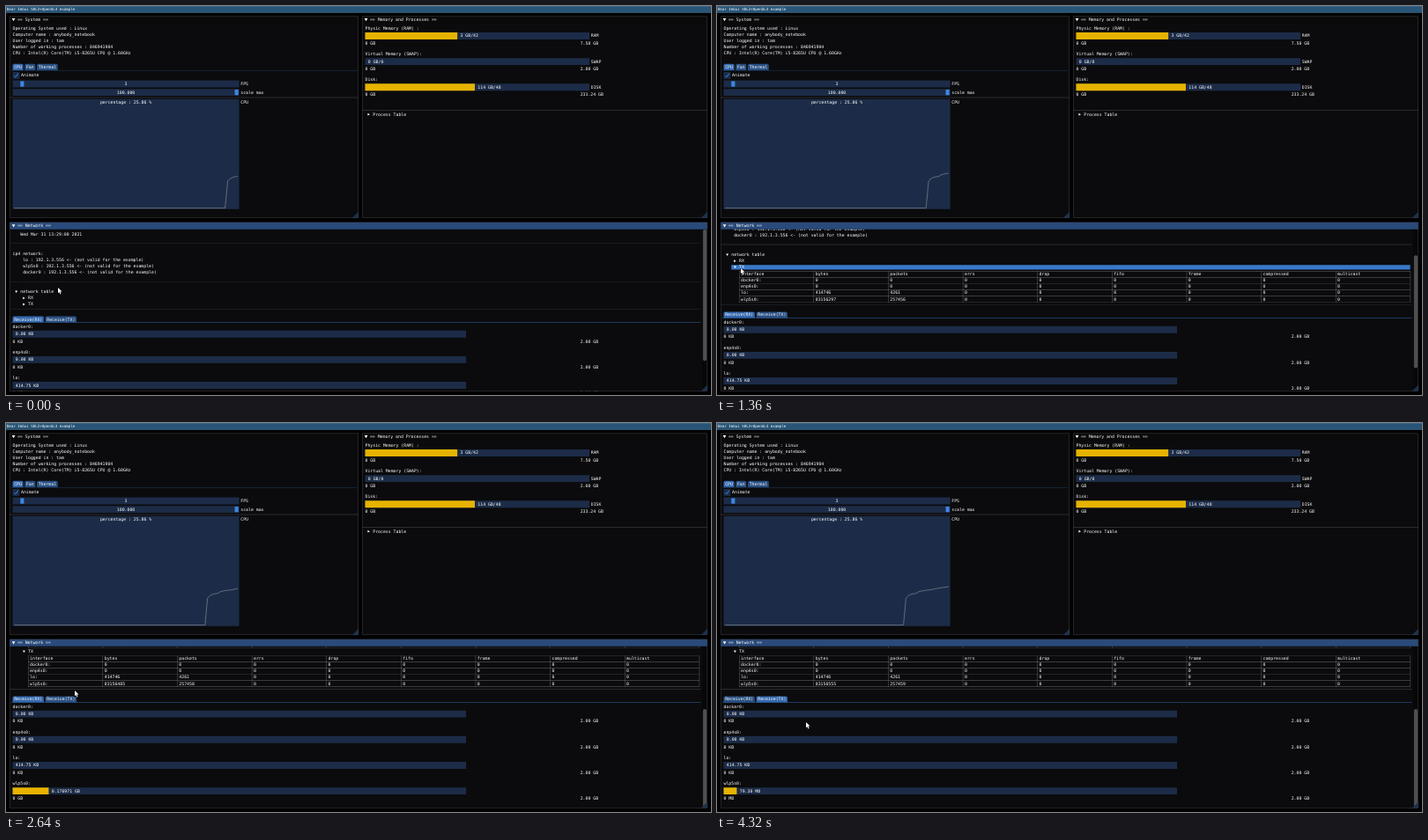
Write an HTML page with a canvas that moves like this. It is 800x442 px and loops after 4360 ms.

```html
<!DOCTYPE html>
<html lang="en">
<head>
<meta charset="utf-8">
<title>System monitor</title>
<style>
html, body { margin: 0; width: 100%; height: 100%; overflow: hidden; background: #000; }
canvas { display: block; }
</style>
</head>
<body>
<canvas id="stage" width="800" height="442"></canvas>
<script>
const LOOP = 4360, SCALE = 2.4;
const MONO = '"DejaVu Sans Mono", "Liberation Mono", monospace';
const BG = '#0b0b0d', LINE = '#4a4a54', GRID = '#6c6c75', FRAME = '#1c2c48', TITLE = '#294a7a',
  TAB = '#294f82', TAB_ON = '#3368ad', HOVER = '#3879ca', GRAB = '#3d85e0', FILL = '#e6b300';
const ctx = document.getElementById('stage').getContext('2d');

// Cursor path: time, x, y in stage pixels
const PATH = [[0, 59, 320], [280, 59, 320], [560, 26, 314], [760, 26, 314], [1100, 27, 298],
  [1480, 27, 298], [1680, 27, 291], [1900, 27, 291], [2240, 78, 304], [2840, 78, 304],
  [3320, 42, 331], [3400, 42, 331], [3800, 62, 315], [4040, 62, 315], [4320, 101, 340]];
// Wheel steps: time, scroll offset
const WHEEL = [[0, 0], [160, 65], [280, 101], [2440, 166], [2520, 231], [2600, 279]];
// CPU curve after the jump, in stage pixels
const LOAD = [199, 196, 194.7, 194, 193.6, 191.8, 191, 190.5, 190, 189.8, 189.5, 188.6,
  188.2, 187.6, 187.2, 186.8, 186.4, 186];

function box(x, y, w, h, color, r = 0) {
  ctx.fillStyle = color;
  ctx.beginPath();
  ctx.roundRect(x, y, w, h, r);
  ctx.fill();
}

function poly(points, color) {
  ctx.fillStyle = color;
  ctx.beginPath();
  points.forEach(([x, y]) => ctx.lineTo(x, y));
  ctx.fill();
}

function stroke(points, color, width) {
  ctx.strokeStyle = color;
  ctx.lineWidth = width;
  ctx.beginPath();
  points.forEach(([x, y]) => ctx.lineTo(x, y));
  ctx.stroke();
}

function text(s, x, top, align = 'left', size = 11.63) {
  ctx.font = size + 'px ' + MONO;
  ctx.textAlign = align;
  ctx.fillStyle = '#fff';
  ctx.fillText(s, x, top + 10);
}

function arrow(x, y, r, open) {
  const a = r * 0.75, b = r * 0.866;
  poly(open ? [[x, y + a], [x - b, y - a], [x + b, y - a]]
            : [[x + a, y], [x - a, y - b], [x - a, y + b]], '#fff');
}

function panel(x, y, w, h, title, focused) {
  box(x, y, w, h, BG);
  box(x, y, w, 19, focused ? TITLE : '#0a0a0a');
  arrow(x + 10.5, y + 9.5, 5.2, true);
  text(title, x + 21, y + 3);
}

function panelEdge(x, y, w, h) {
  poly([[x + w, y + h - 17], [x + w, y + h], [x + w - 17, y + h]], '#1a304f');
  ctx.strokeStyle = LINE;
  ctx.lineWidth = 1;
  ctx.strokeRect(x + 0.5, y + 0.5, w - 1, h - 1);
}

function tabs(names, active, x, y, right, mouse) {
  names.forEach((name, i) => {
    const w = name.length * 7 + 8;
    const over = mouse && inside(mouse, x, y, w, 19);
    box(x, y + 1, w, 17, over ? HOVER : i === active ? TAB_ON : TAB, [4, 4, 0, 0]);
    text(name, x + 4, y + 3);
    x += w + 4;
  });
  box(14, y + 18, right - 14, 1, TAB_ON);
}

const inside = ([mx, my], x, y, w, h) => mx >= x && mx < x + w && my >= y && my < y + h;

function meter(x, y, w, part, label) {
  box(x, y, w, 19, FRAME);
  box(x, y, w * part, 19, FILL);
  text(label, x + w * part + 8, y + 3);
}

function slider(y, value, grabX, label) {
  box(18, y, 617, 19, FRAME);
  box(grabX, y + 2, 10, 15, GRAB);
  text(value, 326.5, y + 3, 'center');
  text(label, 639, y + 3);
}

function system(t) {
  panel(10, 28, 950, 550, '== System ==');
  ['Operating System used : Linux', 'Computer name : anybody_notebook', 'User logged in : tam',
    'Number of working processes : 846941904', 'CPU : Intel(R) Core(TM) i5-8265U CPU @ 1.60GHz'
  ].forEach((s, i) => text(s, 18, 55 + i * 17));
  tabs(['CPU', 'Fan', 'Thermal'], 0, 18, 157, 956);
  box(18, 180, 19, 19, FRAME);
  stroke([[22, 190], [26, 194], [33, 184]], '#4296fa', 2);
  text('Animate', 41, 183);
  slider(203, '3', 39, 'FPS');
  slider(226, '100.000', 623, 'scale max');
  box(10, 249, 950, 1, LINE);

  box(18, 254, 617, 300, FRAME);
  const count = 5 + Math.floor((t + 150) / 333), step = 609 / 89;
  const curve = LOAD.slice(0, count).map((y, i) => [631 - (count - 1 - i) * step, y * SCALE]);
  stroke([[22, 551], [631 - count * step, 551], ...curve], '#a8a8a8', 1.2);
  text('percentage : 25.86 %', 326.5, 257, 'center');
  text('CPU', 639, 257);
  panelEdge(10, 28, 950, 550);
}

function memory() {
  panel(970, 28, 940, 550, '== Memory and Processes ==');
  [['Physic Memory (RAM) :', 0.411, '3 GB/42', 'RAM', '7.50 GB'],
    ['Virtual Memory (SWAP):', 0, '0 GB/0', 'SWAP', '2.00 GB'],
    ['Disk:', 0.489, '114 GB/48', 'DISK', '233.24 GB']
  ].forEach(([head, part, label, name, max], i) => {
    const y = 55 + i * 70;
    text(head, 978, y);
    meter(978, y + 17, 611, part, label);
    text(name, 1593, y + 20);
    text('0 GB', 978, y + 40);
    text(max, 1564, y + 40);
  });
  box(970, 284, 940, 1, LINE);
  arrow(988, 295.5, 4, false);
  text('Process Table', 999, 289);
  panelEdge(970, 28, 940, 550);
}

function node(label, x, y, open, mouse) {
  if (inside(mouse, x, y, 1888 - x, 13)) box(x, y, 1888 - x, 13, HOVER);
  arrow(x + 10, y + 6.5, 4, open);
  text(label, x + 21, y);
}

function table(y, tail, bytes, packets) {
  const pitch = 1828 / 9;
  const rows = [['interface', 'bytes', 'packets', 'errs', 'drop', 'fifo', ...tail],
    ['docker0:', 0, 0], ['enp4s0:', 0, 0], ['lo:', 414746, 4261], ['wlp5s0:', bytes, packets]];
  rows.forEach((row, r) => {
    for (let c = 0; c < 9; c++) text(String(row[c] ?? 0), 65 + c * pitch, y + 2 + r * 17);
  });
  for (let r = 0; r <= 5; r++) box(60, y + r * 17, 1828, 1, GRID);
  for (let c = 0; c <= 9; c++) box(60 + c * pitch, y, 1, 86, GRID);
}

function network(t, pointer) {
  const scroll = WHEEL.filter(w => w[0] <= t).pop()[1];
  const openTX = t >= 1240, openRX = t >= 1840, sending = t >= 4000;
  const mouse = [pointer[0], pointer[1] + scroll];
  panel(10, 590, 1900, 460, '== Network ==', true);
  ctx.save();
  ctx.beginPath();
  ctx.rect(10, 609, 1900, 441);
  ctx.clip();
  ctx.save();
  ctx.translate(0, -scroll);
  const rule = y => box(10, y, 1882, 1, LINE);

  text('Wed Mar 31 13:29:08 2021', 39, 617);
  rule(646);
  text('ip4 network:', 18, 668);
  ['lo', 'wlp5s0', 'docker0'].forEach((name, i) =>
    text(name + ' : 192.1.3.556 <- (not valid for the example)', 46, 685 + i * 17));
  rule(751);

  node('network table', 18, 773, true, mouse);
  node('RX', 39, 790, openRX, mouse);
  let y = 807;
  if (openRX) {
    table(y, ['colls', 'carrier', 'compressed'], 190020952, 347232);
    y += 89;
  }
  node('TX', 39, y, openTX, mouse);
  y += 17;
  if (openTX) {
    const [bytes, packets] = sending ? [83156555, 257459] : t >= 2000 ? [83156485, 257458] : [83156297, 257456];
    table(y, ['frame', 'compressed', 'multicast'], bytes, packets);
    y += 89;
  }
  rule(y + 2);
  tabs(['Receive(RX)', 'Receive(TX)'], sending ? 1 : 0, 18, y + 21, 1892, mouse);

  const last = sending ? ['79.30 MB', 0.029, 'MB'] : ['0.176971 GB', 0.0795, 'GB'];
  [['docker0', '0.00 KB', 0, 'KB'], ['enp4s0', '0.00 KB', 0, 'KB'],
    ['lo', '414.75 KB', 0, 'KB'], ['wlp5s0', ...last]
  ].forEach(([name, label, part, unit], i) => {
    const top = y + 44 + i * 70;
    text(name + ':', 18, top);
    meter(18, top + 17, 1235, part, label);
    text('0 ' + unit, 18, top + 40);
    text('2.00 GB', 1564, top + 40);
  });
  ctx.restore();

  const view = 441, total = view + 101 + 89 * (openTX + openRX);
  box(1896, 609, 14, view, '#070707');
  box(1898, 609 + scroll / total * view, 10, view * view / total, '#4f4f4f', 5);
  ctx.restore();
  panelEdge(10, 590, 1900, 460);
}

function pointerAt(t) {
  const i = Math.max(1, PATH.findIndex(p => p[0] >= t));
  const [a, b] = [PATH[i - 1], PATH[i]];
  const k = (t - a[0]) / (b[0] - a[0]), e = k * k * (3 - 2 * k);
  return [1, 2].map(n => (a[n] + (b[n] - a[n]) * e) * SCALE);
}

function cursor([x, y]) {
  const shape = [[0, 0], [0, 15], [3.5, 12], [6, 18], [8.5, 17], [6, 11], [11, 11], [0, 0]]
    .map(([dx, dy]) => [x + dx, y + dy]);
  stroke(shape, '#000', 2.5);
  poly(shape, '#fff');
}

function draw(now) {
  const t = Math.floor(now % LOOP / 40) * 40;
  const pointer = pointerAt(t);
  ctx.setTransform(1 / SCALE, 0, 0, 1 / SCALE, 0, 0);
  ctx.textRendering = 'geometricPrecision';
  box(0, 0, 1920, 1061, '#000');
  box(0, 0, 1920, 18, '#285577');
  box(0, 0, 1920, 1, '#4c7899');
  box(0, 17, 1920, 1, '#4c7899');
  text('Dear ImGui SDL2+OpenGL3 example', 2, 2, 'left', 9.97);
  system(t);
  memory();
  network(t, pointer);
  cursor(pointer);
}

const start = performance.now();
function tick() {
  draw(performance.now() - start);
  requestAnimationFrame(tick);
}
tick();
</script>
</body>
</html>
```
